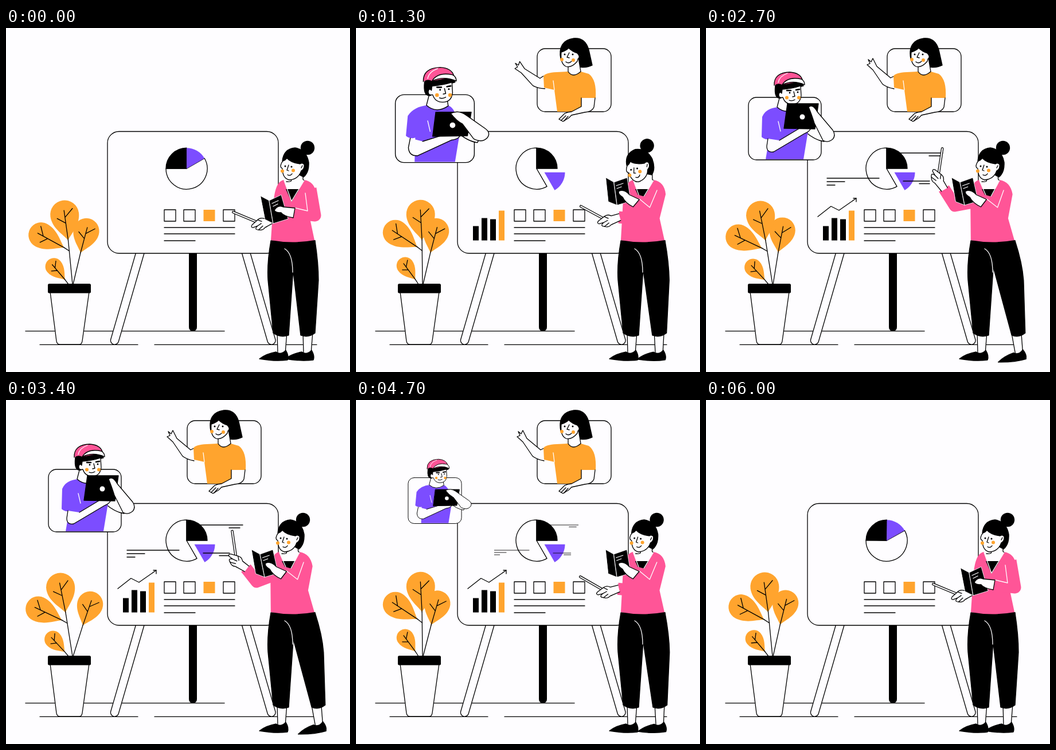
Animation of 600x600 px, one loop 6100 ms. Source, as an HTML page:

```html
<!DOCTYPE html>
<html lang="en">
<head>
<meta charset="utf-8">
<title>Presentation</title>
<style>
  html, body { margin: 0; width: 100%; height: 100%; overflow: hidden; background: #fefdff; }
  svg { display: block; width: 100vw; height: 100vh; fill: #fefdff; stroke: #000; stroke-width: 1.3;
        stroke-linecap: round; stroke-linejoin: round; }
  .line { fill: none; }
  .black { fill: #000; }
  .dot { fill: #000; stroke: none; }
  .orange { fill: #ffa42e; stroke: none; }
  .pink { fill: #ff5597; stroke: none; }
  .purple { fill: #7c4dff; stroke: none; }
  .seam { fill: none; stroke: #fefdff; }
  .sleeve { fill: none; stroke: #ff5597; stroke-width: 21; stroke-linecap: butt; }
</style>
</head>
<body>
<svg viewBox="0 0 600 600">
  <path class="line" d="M34 528.700H381M59 552.300H230M259 552.300H542"/>

  <!-- easel -->
  <path d="M326 393V522" stroke-width="14"/>
  <path d="M234.500 390L189.500 545M418 390L463 545" stroke-width="15.400"/>
  <path d="M234.500 390L189.500 545M418 390L463 545" stroke-width="12.800" stroke="#fefdff"/>
  <rect x="177" y="180.500" width="298" height="212.500" rx="20"/>
  <path class="line" d="M276 317h20v20h-20zM310 317h20v20h-20zM379 317h20v20h-20zM276 348H399M276 359H399M276 371H330"/>
  <path class="orange" d="M344.500 317h20v20h-20z"/>

  <!-- charts -->
  <g id="pie">
    <path d="M0 0L18 31.200A36 36 0 1 1 0 -36z"/>
    <path class="black" d="M0 0V-36A36 36 0 0 1 36 0z"/>
    <path id="wedge" class="purple" d="M0 0H36A36 36 0 0 1 18 31.200z"/>
  </g>
  <path id="noteTop" class="line" d="M0 0H76M52 5H71"/>
  <path id="noteSide" class="line" d="M0 0H46M28 4.500H46"/>
  <path id="noteLeft" class="line" d="M0 0H-91M-91 6H-60M-91 12H-77"/>
  <g id="bars">
    <path class="dot" d="M204 0v-25h10v25zM219 0v-39h10v39zM234 0v-37h10v37z"/>
    <path class="orange" d="M249 0v-52h10v52z"/>
  </g>
  <path id="trend" class="line" pathLength="1" d="M195 329L218 311L232 318L262 297"/>
  <path id="trendHead" class="line" d="M-5 0H0V6"/>

  <!-- plant -->
  <g id="plant"></g>
  <path d="M77 460L88 546Q89 552 94 552H128Q132 552 133 546L145 460z"/>
  <rect class="dot" x="73" y="446" width="75" height="16.500" rx="2.500"/>

  <!-- caller with a bob -->
  <g id="girl">
    <rect x="316" y="36" width="129" height="110" rx="14"/>
    <path id="wave" d="M328 84L322 87L298 67L291 53L288 59L283 55L286 62L281 64L291 73L308 98Q316 104 328 106"/>
    <path class="orange" d="M370 76L350 77Q330 78 327 84L328 104L346 108L351 146H405L412 122L418 122Q420 90 406 80L392 76Q378 88 370 76z"/>
    <path d="M417 122L415 138Q412 146 399 147L376 152L371 157L361 163L354 159L364 149Q370 146 376 146L393 137V122"/>
    <path class="line" d="M358 161L366 153M363 162L370 154"/>
    <path class="seam" d="M344 92L346 108"/>
    <path class="black" d="M357 54Q351 22 380 18Q400 16 406 38L412 65Q402 70 391 68L372 60z"/>
    <path d="M370 62V76Q378 88 392 76L388 52"/>
    <path d="M358 42Q366 40 371 35Q377 41 386 44Q392 50 387 54L386 58Q376 70 366 67Q356 62 358 42z"/>
    <path class="line" d="M372 43L368 51L372 52M366 59Q371 63 376 58"/>
    <g class="dot"><circle cx="364" cy="46" r="1.500"/><circle cx="378" cy="46" r="1.500"/></g>
    <g class="orange"><circle cx="359" cy="55" r="3"/><circle cx="379" cy="56" r="3"/></g>
  </g>

  <!-- caller with a tablet -->
  <g id="boy">
    <rect x="74" y="121" width="127" height="109" rx="14"/>
    <path d="M172 160L216 176L206 198Q190 196 172 180z"/>
    <path id="shirt" class="purple"/>
    <path d="M130 115L124 138Q140 152 159 139L157 126"/>
    <path class="black" d="M121 100Q118 125 131 122L134 110Q150 107 170 101L168 92L125 96z"/>
    <path d="M133 107Q150 106 165 101L166 118Q164 133 150 133Q138 133 134 121Q126 123 127 115Q129 110 132 114z"/>
    <path class="line" d="M153 111L155 119L151 120M145 126Q150 128 155 125"/>
    <path class="line" stroke-width="2.500" d="M141 109L148 109M157 108L163 107"/>
    <g class="dot"><circle cx="146" cy="113" r="1.400"/><circle cx="160" cy="112" r="1.400"/></g>
    <g class="orange"><circle cx="141" cy="121.500" r="3"/><circle cx="162" cy="121.500" r="3"/></g>
    <path class="pink" d="M119 100Q118 78 146 77Q164 78 169 92L133 99Q126 95 119 100z"/>
    <path d="M133 99Q142 84 166 89Q172 92 172 99Q152 90 133 99z"/>
    <path class="line" d="M119 100Q118 78 146 77Q164 78 168 90"/>
    <path class="seam" d="M126 95Q128 84 142 79M126 163L130 180"/>
    <path id="nearArm"/>
    <path id="tablet" class="black"/>
    <circle id="badge" r="4.500" stroke="none"/>
    <path id="farArm"/>
  </g>

  <!-- presenter -->
  <defs>
    <g id="foot">
      <path d="M473 530L474 568H487L490 530"/>
      <path class="black" d="M442 577Q454 568 471 565Q480 571 488 562Q494 572 491 579Q470 582 442 577z"/>
    </g>
  </defs>
  <use href="#foot"/>
  <use id="step" href="#foot"/>
  <path id="rightLeg" class="black"/>
  <path class="black" d="M462 371Q455 410 457 440L466 532Q479 541 493 536L501 420L539 371z"/>
  <path class="seam" d="M486 385Q500 393 500 426"/>
  <g id="torso">
    <path class="pink" d="M485 265C472 267 468 285 466 310L462 370Q500 377 538 370L530 332L541 290Q539 268 520 265L500 280z"/>
    <path stroke="none" d="M485 265L498 303L520 265z"/>
    <path class="dot" d="M488 281H512L498 303z"/>
    <path d="M497 250V264Q500 269 489 268M518 250V264L520 266"/>
    <path class="seam" d="M485 266L498 302L520 266"/>
  </g>
  <path id="pointArm" class="sleeve"/>
  <g id="pointer">
    <path d="M10 0H-52" stroke-width="4.600"/>
    <path d="M10 0H-52" stroke-width="2.200" stroke="#fefdff"/>
  </g>
  <g id="hand">
    <path d="M2 -6L-12 -6Q-18 -11 -24 -8L-36 -3Q-40 0 -36 2L-28 2Q-36 6 -28 9Q-22 13 -16 9L2 6"/>
    <path class="line" d="M-28 2L-20 0M-28 9L-19 5M-24 -8L-18 -3"/>
  </g>
  <g id="bookArm">
    <path id="bookSleeve" class="sleeve"/>
    <path id="fold" class="seam"/>
    <path id="book" class="black" stroke="#fefdff" stroke-width=".8"/>
    <path id="bookText" class="seam"/>
    <path id="bookHand"/>
  </g>
  <g id="head">
    <circle class="dot" cx="526" cy="209" r="12.200"/>
    <path class="black" d="M482 232Q484 211 504 209Q524 212 528 234Q529 252 519 260L500 250z"/>
    <path d="M483 232Q480 235 479 240Q479 244 482 245Q482 262 494 265Q510 264 515 249Q521 246 520 238Q517 234 513 237Q497 235 490 227Q487 231 483 232z"/>
    <path class="line" d="M493 239L490 248L493 249M491 256Q496 259 499 254M515 244l2-4"/>
    <g class="dot"><circle cx="487" cy="241" r="1.500"/><circle cx="498" cy="242" r="1.500"/></g>
    <g class="orange"><circle cx="482" cy="249.500" r="3"/><circle cx="501" cy="248.500" r="3"/></g>
  </g>
</svg>
<script>
const LOOP = 6100, STEP = 100;
const el = id => document.getElementById(id);
const set = (id, name, value) => el(id).setAttribute(name, value);
const move = (id, value) => set(id, 'transform', value);
const grow = (id, x, y, s) => move(id, `translate(${x} ${y}) scale(${s})`);
const zoom = (id, x, y, s) => move(id, `translate(${x} ${y}) scale(${s}) translate(${-x} ${-y})`);

const lerp = (a, b, k) => a + (b - a) * k;
const rise = (t, start, ms) => 0.5 - 0.5 * Math.cos(Math.PI * Math.min(1, Math.max(0, (t - start) / ms)));
// Eases from 0 to 1 at start and back to 0 at end.
const show = (t, start, end, ms) => rise(t, start, ms) - rise(t, end, ms);
// The same, growing past full size before it settles.
const pop = (t, start, end) => 1.2 * rise(t, start, 520) - 0.2 * rise(t, start + 520, 310) - rise(t, end, 550);

// Path between two paths with the same commands.
function blend(a, b, k) {
  const number = /-?[\d.]+/g, ends = b.match(number);
  let n = 0;
  return a.replace(number, v => lerp(+v, +ends[n++], k).toFixed(2));
}
const morph = (id, a, b, k) => set(id, 'd', blend(a, b, k));

function leaf(x, y, angle, r, d) {
  return `<g transform="translate(${x} ${y}) rotate(${angle})">
    <path class="orange" d="M0 0C${-r * .3} ${-d * .25} ${-r} ${-d * .55} ${-r} ${-d}
      A${r} ${r} 0 0 1 ${r} ${-d}C${r} ${-d * .55} ${r * .3} ${-d * .25} 0 0z"/>
    <path class="line" d="M0 0V${-d - r * .3}M0 ${-d + r * .6}L${-r * .55} ${-d + r * .2}
      M0 ${-d + r * .2}L${r * .6} ${-d - r * .35}"/></g>`;
}
const stem = d => `<path class="line" d="${d}"/>`;

el('plant').innerHTML = `
  <g id="rightStem">${stem('M117 447L130 392') + leaf(130, 392, 15, 22.5, 39)}</g>
  <g id="mainStem">${stem('M116 447L109 370M111 389L102 383') + leaf(102, 383, -61, 22, 46) + leaf(109, 370, -7.6, 25, 45)}</g>
  <g id="smallStem">${stem('M109 447L103 439') + leaf(103, 439, -40, 15, 30)}</g>`;

function drawBoard(t) {
  const apart = show(t, 650, 5000, 450);
  move('pie', `translate(315 245.2) rotate(${-90 + 90 * show(t, 100, 5200, 850)})`);
  move('wedge', `translate(${13.5 * apart} ${6.5 * apart})`);

  grow('noteSide', 344, 267, show(t, 1400, 4500, 510));
  grow('noteTop', 337, 218, show(t, 1550, 4500, 510));
  grow('noteLeft', 302, 262, show(t, 1900, 4500, 510));

  move('bars', `translate(0 370.5) scale(1 ${show(t, 600, 5000, 530)})`);
  const drawn = show(t, 1300, 4850, 600);
  set('trend', 'stroke-dasharray', `${drawn} 2`);
  set('trend', 'visibility', drawn > 0 ? 'visible' : 'hidden');
  grow('trendHead', 262, 297, show(t, 1500, 4800, 250));
}

function drawPlant(t) {
  const a = 2 * Math.PI * t / LOOP;
  const sway = 0.9 - 3.5 * Math.cos(2 * a) + 2.2 * Math.cos(a);
  const side = 5 * Math.sin(2 * a) - 2.5 * Math.sin(a);
  move('mainStem', `rotate(${sway} 116 447)`);
  move('smallStem', `rotate(${sway * .8} 109 447)`);
  move('rightStem', `rotate(${side} 117 447)`);
}

function drawCallers(t) {
  zoom('girl', 380.5, 91, pop(t, 250, 4950));
  move('wave', `rotate(${-8 + 8 * rise(t, 1600, 900)} 327 95)`);

  zoom('boy', 137.5, 175.5, pop(t, 610, 4510));
  const lift = show(t, 1850, 4000, 550);
  morph('shirt', 'M126 138Q104 140 94 155L91 187Q98 193 106 190L105 229H170L178 180L172 160Q170 142 158 138Q150 152 126 138z',
                 'M126 138Q104 140 98 155L97 190Q102 195 110 194L104 229H170L178 180L172 160Q170 142 158 138Q150 152 126 138z', lift);
  morph('nearArm', 'M98 191L95 206Q96 220 110 219L164 194Q180 192 178 182Q172 176 160 183L118 196',
                   'M108 193L106 206Q106 218 118 216L172 184Q184 180 184 168Q178 164 168 172L128 196', lift);
  morph('tablet', 'M139 149L196 149L190 187L134 188z', 'M142 132L196 132L190 176L136 175z', lift);
  morph('farArm', 'M163 151Q176 145 188 154L218 175Q228 182 222 190Q214 199 200 192L182 168Q172 163 163 151z',
                  'M179 138Q186 132 194 146L221 178Q227 187 221 194Q212 201 204 196L189 166Q184 150 179 138z', lift);
  set('badge', 'cx', lerp(166, 168, lift));
  set('badge', 'cy', lerp(170, 155, lift));
}

function drawPresenter(t) {
  const point = show(t, 1150, 4250, 620);
  const lean = -8 * point;
  const skew = `matrix(1 0 ${-lean / 104} 1 ${372 * lean / 104} 0)`;
  move('torso', skew);
  move('bookArm', skew);
  move('head', `translate(${lean} 0) rotate(${-17 * show(t, 200, 1900, 800)} 505 265)`);

  const stride = point * (26 - 7 * Math.cos(2 * Math.PI * (t - 3050) / 2200));
  move('step', `translate(${45 + stride} 0) rotate(${-stride * .4} 480 578)`);
  morph('rightLeg', 'M486 371L539 371Q545 410 545 440L539 532Q527 541 514 536L501 425z',
                    'M486 371L539 371Q554 410 557 440L563 532Q552 541 540 536L504 425z', stride / 30);

  // The stick is raised to the wedge, then lifted higher and half lowered.
  const high = (show(t, 1950, 2850, 600) + show(t, 1950, 4100, 600)) / 2;
  const wristX = lerp(464, 422, point) - 7 * high;
  const wristY = lerp(334, 307, point) - 27 * high;
  const bend = lerp(-20, 16, point) + 44 * high;
  const aim = lerp(22.6, 64.5, point) + 34 * high;
  const a = bend * Math.PI / 180;
  set('pointArm', 'd', `M${482 + lean * .7} 302L${lerp(488, 440, point) - 6 * high} ${lerp(333, 324, point) - 14 * high}L${wristX} ${wristY}`);
  move('hand', `translate(${wristX} ${wristY}) rotate(${bend})`);
  move('pointer', `translate(${wristX - 21 * Math.cos(a)} ${wristY - 21 * Math.sin(a)}) rotate(${aim})`);

  const raised = show(t, 100, 4800, 650);
  morph('bookSleeve', 'M531 280L539 327L503 323', 'M530 282L519 309L490 301', raised);
  morph('fold', 'M522 288L526 319L505 314', 'M526 283L513 313L495 298', raised);
  morph('book', 'M444 293L459 301L466 341L452 334zM459 301L480 291L492 333L466 341z',
                'M437 261L451 269L456 309L441 303zM451 269L474 261L480 302L456 309z', raised);
  morph('bookText', 'M464 306L475 301M466 311L474 307', 'M455 275L467 271M456 280L464 277', raised);
  morph('bookHand', 'M504 314L483 312Q474 308 468 318Q470 322 480 322Q484 328 501 331z',
                    'M495 299L478 291Q468 280 459 285Q458 290 466 295Q470 305 484 312z', raised);
}

function frame(now) {
  const t = Math.floor(now % LOOP / STEP) * STEP;
  drawBoard(t);
  drawPlant(t);
  drawCallers(t);
  drawPresenter(t);
  requestAnimationFrame(frame);
}
frame(0);
</script>
</body>
</html>
```
